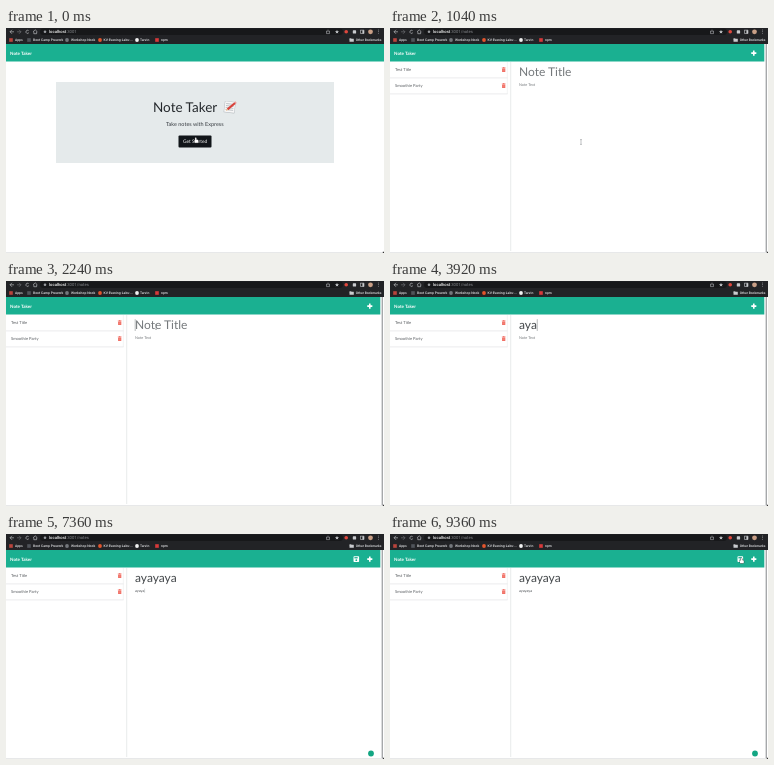
Animation, 378 px wide and 225 px high, one loop 9520 ms. Source, as an HTML page with a canvas:

```html
<!DOCTYPE html>
<html lang="en">
<head>
<meta charset="utf-8">
<title>Note Taker</title>
<style>
html, body { margin: 0; width: 100%; height: 100%; overflow: hidden; background: #fff; }
canvas { display: block; width: 378px; height: 225px; }
</style>
</head>
<body>
<canvas id="stage"></canvas>
<script>
const LOOP = 9520, W = 378, H = 225, TEAL = '#1ab091';
const canvas = document.getElementById('stage');
const c = canvas.getContext('2d');
const dpr = window.devicePixelRatio || 1;
canvas.width = W * dpr;
canvas.height = H * dpr;
c.scale(dpr, dpr);
c.textRendering = 'geometricPrecision';

const LATO = 'Lato, sans-serif', UI = 'Roboto, sans-serif';
const WORD = 'ayayaya';
const titleKeys = [3680, 3760, 3920, 4080, 4240, 4400, 4560];
const bodyKeys = [6400, 6800, 6960, 7280, 7360, 7600, 7760];

// Pointer waypoints: time, x, y
const toTitle = [[0, 190, 112], [800, 191, 114], [1040, 191, 114], [1440, 172.8, 99], [1900, 150, 46]];
const toBody = [[5440, 171, 50], [5760, 167, 67]];
const toSave = [[8000, 167, 46], [8160, 167, 46], [8320, 200, 90], [8560, 265, 84], [8960, 351.5, 26.5]];

function rect(x, y, w, h, color, r = 0) {
  c.fillStyle = color;
  c.beginPath();
  c.roundRect(x, y, w, h, r);
  c.fill();
}

function dot(x, y, r, color) {
  c.fillStyle = color;
  c.beginPath();
  c.arc(x, y, r, 0, 7);
  c.fill();
}

function line(color, width, ...pts) {
  c.strokeStyle = color;
  c.lineWidth = width;
  c.beginPath();
  for (let i = 0; i < pts.length; i += 2) c.lineTo(pts[i], pts[i + 1]);
  c.stroke();
}

// Returns the x where the text ends
function text(s, x, y, size, color, family = LATO, weight = 400) {
  c.font = `${weight} ${size}px ${family}`;
  c.fillStyle = color;
  c.fillText(s, x, y);
  return x + c.measureText(s).width;
}

function along(path, t) {
  let i = 0;
  while (i < path.length - 2 && t >= path[i + 1][0]) i++;
  const [a, b] = [path[i], path[i + 1]];
  const k = Math.min(1, Math.max(0, (t - a[0]) / (b[0] - a[0])));
  const e = k * k * (3 - 2 * k);
  return [a[1] + (b[1] - a[1]) * e, a[2] + (b[2] - a[2]) * e];
}

const typed = (keys, t) => WORD.slice(0, keys.filter(k => t >= k).length);

function star(x, y, r, color) {
  c.fillStyle = color;
  c.beginPath();
  for (let i = 0; i < 10; i++) {
    const a = i * Math.PI / 5, d = i % 2 ? r * 0.45 : r;
    c.lineTo(x + d * Math.sin(a), y - d * Math.cos(a));
  }
  c.fill();
}

function chrome(notes) {
  const ink = '#c9cbce';
  rect(0, 0, W, 16, '#222326');
  rect(34, 0.4, 303, 6.6, '#17181a', 3.3);
  line(ink, 0.6, 6, 1.8, 4, 3.8, 6, 5.8);
  line(ink, 0.6, 4, 3.8, 8, 3.8);
  line('#77797c', 0.6, 13, 1.8, 15, 3.8, 13, 5.8);
  line('#77797c', 0.6, 11, 3.8, 15, 3.8);
  c.strokeStyle = ink;
  c.beginPath();
  c.arc(21.5, 3.8, 1.6, 0.5, 5.6);
  c.stroke();
  line(ink, 0.6, 27, 3.8, 29.2, 1.8, 31.4, 3.8);
  line(ink, 0.6, 27.8, 3.6, 27.8, 5.7, 30.6, 5.7, 30.6, 3.6);
  dot(39, 3.8, 1.3, '#9a9ca0');
  const x = text('localhost', 43, 5.2, 4.2, '#f2f2f2', UI, 500);
  text(':3001' + (notes ? '/notes' : ''), x, 5.2, 4.2, '#85878b', UI);

  line(ink, 0.5, 321.4, 3, 320.5, 3, 320.5, 5.6, 323.5, 5.6, 323.5, 3, 322.6, 3);
  line(ink, 0.5, 322, 1.6, 322, 4.2);
  star(331, 3.9, 2.1, ink);
  dot(340.2, 3.8, 1.8, '#e0473d');
  rect(346.8, 2.3, 3.3, 3.3, ink, 0.6);
  line(ink, 0.6, 354.5, 2.2, 358, 2.2, 358, 5.5, 354.5, 5.5, 354.5, 1.9);
  rect(356.4, 2.2, 1.6, 3.3, ink);
  dot(364.5, 3.8, 2.4, '#c99f86');
  for (const y of [2, 3.8, 5.6]) dot(372.5, y, 0.45, ink);

  const mark = (s, x, color, ix, square) => {
    if (square) rect(ix - 1.8, 10.2, 3.6, 3.6, color);
    else dot(ix, 12, 1.9, color);
    text(s, x, 13.2, 3.4, '#e6e7e9', UI, 500);
  };
  mark('Apps', 9, '#b9443c', 5, true);
  mark('Boot Camp Prework', 27, '#50545a', 23, true);
  mark('Workshop Nook', 65, '#74777c', 61);
  mark('KV-Evening-Labs-…', 97.5, '#e2552d', 94);
  mark('Tarvin', 134, '#f2f2f2', 131);
  mark('npm', 155, '#d8393a', 151, true);
  rect(343.5, 10.4, 1.8, 1, ink);
  rect(343.5, 10.8, 4.3, 2.9, ink, 0.3);
  text('Other Bookmarks', 349.7, 13.2, 3.3, '#e6e7e9', UI, 500);
}

function header(width) {
  rect(0, 16, width, 17.6, TEAL);
  text('Note Taker', 4, 26.7, 4.5, '#fff', LATO, 700);
}

function memo(x, y) {
  c.save();
  c.translate(x, y);
  c.rotate(0.12);
  rect(-5.8, -5.5, 11, 11.4, '#b9bec2', 0.5);
  rect(-5.3, -5.1, 10, 10.4, '#f7f7f7', 0.4);
  for (let i = 0; i < 4; i++) line('#8d959b', 0.5, -4.2, -3 + i * 2, 3.5, -3 + i * 2);
  line('#d8433c', 2.2, -2.2, 2.6, 4.6, -4.6);
  line('#eebf8a', 1.4, -3.3, 3.8, -2.2, 2.6);
  line('#f09b95', 2.2, 4.6, -4.6, 5.5, -5.5);
  c.restore();
}

function home(t) {
  header(W);
  rect(50, 54, 278, 81, '#e5eaeb');
  text('Note Taker', 147, 83.8, 13.5, '#24282c');
  memo(224, 79);
  text('Take notes with Express', 160, 98.4, 5.5, '#363b40');
  rect(172.5, 107.5, 33, 12, '#111519', 1);
  text('Get Started', 177, 115.2, 4.8, '#fff');
  if (t >= 240) {
    rect(0, 219.5, 33, 5.5, '#2a2b2e', 0.8);
    text('localhost:3001/notes', 1, 223.5, 3.2, '#d0d1d3', UI);
  }
}

function trash(x, y) {
  const red = '#f0655a';
  rect(x - 0.7, y - 2.5, 1.4, 0.7, red);
  rect(x - 1.9, y - 2.1, 3.8, 0.7, red);
  rect(x - 1.6, y - 1.1, 3.2, 3.5, red, 0.4);
  for (const d of [-0.7, 0, 0.7]) line('#f8b9b3', 0.25, x + d, y - 0.5, x + d, y + 1.8);
}

function notesPage(t) {
  header(374.3);
  // Scrollbar at the window edge
  rect(375.6, 16, 1.4, 208, '#a6a8aa');
  rect(361.2, 24.3, 5.2, 1.6, '#fff', 0.3);
  rect(363, 22.5, 1.6, 5.2, '#fff', 0.3);

  line('#e0e2e3', 0.7, 120.7, 34, 120.7, 223);
  line('#e9ebec', 0.6, 117.3, 34, 117.3, 66);
  ['Test Title', 'Smoothie Party'].forEach((s, i) => {
    const y = 41.7 + i * 16;
    text(s, 5, y + 1.6, 4.1, '#5a5e62');
    trash(113.7, y);
    line('#e2e4e5', 0.7, 0, y + 8.2, 117.5, y + 8.2);
  });

  const title = typed(titleKeys, t), body = typed(bodyKeys, t);
  const titleEnd = text(title || 'Note Title', 129, 48.2, 12, title ? '#44484b' : '#75797c');
  const bodyEnd = text(body || 'Note Text', 129, 58, 3.8, body ? '#505458' : '#75797c');

  const titleCaret = t >= 2240 && t < 5920 &&
    !(t >= 2800 && t < 3280) && !(t >= 5040 && t < 5600);
  if (titleCaret) {
    const x = title ? titleEnd + 0.4 : 129.2;
    line('#8a8d90', 0.6, x, 38.2, x, 50);
  }
  const bodyCaret = t >= 5920 && t < 8240 && !(t >= 6240 && t < 6400);
  if (bodyCaret) {
    const x = body ? bodyEnd + 0.2 : 129.2;
    line('#8a8d90', 0.35, x, 54.6, x, 58.8);
  }

  if (t >= 6800) {
    rect(347.5, 22.3, 5.6, 5.6, '#fff', 0.7);
    rect(348.4, 23.1, 3.3, 1.3, TEAL);
    dot(350.3, 26.2, 0.9, TEAL);
  }
  if (t >= 6400) dot(365, 219.5, 2.9, '#13a683');
}

function beam(x, y) {
  const gray = '#808488';
  line(gray, 0.5, x, y - 2.2, x, y + 2.2);
  line(gray, 0.5, x - 1, y - 2.4, x + 1, y - 2.4);
  line(gray, 0.5, x - 1, y + 2.4, x + 1, y + 2.4);
}

function hand(x, y) {
  c.beginPath();
  c.roundRect(x - 0.9, y - 2.4, 1.3, 4, 0.6);
  c.roundRect(x - 1.5, y - 0.3, 3.8, 3.1, 0.9);
  c.strokeStyle = '#333';
  c.lineWidth = 0.8;
  c.stroke();
  c.fillStyle = '#fff';
  c.fill();
}

function arrow(x, y) {
  c.beginPath();
  for (const [dx, dy] of [[0, 0], [0, 4.6], [1.1, 3.6], [2, 5.2], [2.6, 4.9], [1.9, 3.4], [3.3, 3.3]])
    c.lineTo(x + dx, y + dy);
  c.closePath();
  c.fillStyle = '#222';
  c.fill();
  c.strokeStyle = '#fff';
  c.lineWidth = 0.4;
  c.stroke();
}

function pointer(t) {
  if (t < 3680) (t < 1040 ? hand : beam)(...along(toTitle, t));
  else if (t >= 5440 && t < 6400) beam(...along(toBody, t));
  else if (t >= 8000) {
    const [x, y] = along(toSave, t);
    (x > 346 ? hand : y < 34 ? arrow : beam)(x, y);
  }
}

function draw(now) {
  const t = now % LOOP, notes = t >= 960;
  rect(0, 0, W, H, '#fff');
  (notes ? notesPage : home)(t);
  line('#c4c6c8', 0.5, 0, 224.7, W, 224.7);
  rect(376.8, 223.8, 1.2, 1.2, '#333');
  chrome(notes);
  pointer(t);
}

const start = performance.now();
function tick() {
  draw(performance.now() - start);
  requestAnimationFrame(tick);
}
tick();
</script>
</body>
</html>
```
